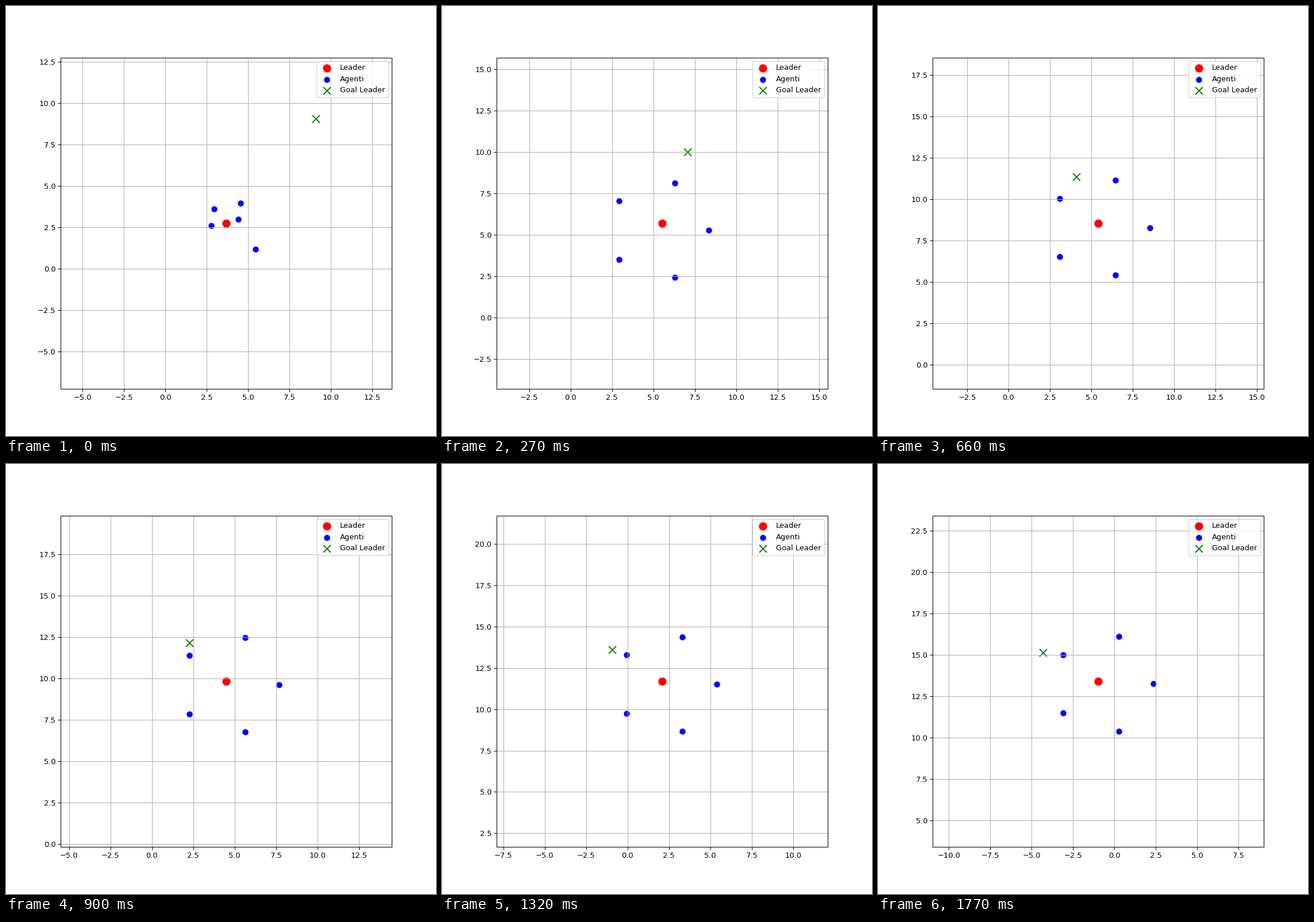
Animation, 748 px wide and 748 px high, one loop 1.8 s. Source, as a matplotlib script:

```python
import numpy as np
import matplotlib.pyplot as plt
from matplotlib.animation import FuncAnimation

FRAMES, INTERVAL = 60, 30
VIEW = 10            # half width of the window that follows the leader
RATE = 0.0634        # leader convergence per frame
TAU = 1.46           # agent time constant in frames

goal_start = np.array([9.09, 9.062])
goal_vel = np.array([-0.2274, 0.1034])
gap_start = np.array([5.405, 6.32])    # goal minus leader
gap_end = np.array([-3.57, 1.63])

angles = 2 * np.pi * np.arange(5) / 5
slots = 3 * np.column_stack([np.cos(angles), np.sin(angles)])
agents_start = np.array([   # relative to the leader
    [0.717, 0.217],
    [0.856, 1.189],
    [-0.741, 0.876],
    [-0.898, -0.165],
    [1.759, -1.572],
])


def goal_at(n):
    return goal_start + goal_vel * n


def leader_at(n):
    gap = gap_end + (gap_start - gap_end) * np.exp(-RATE * n)
    return goal_at(n) - gap


def lag_at(n):
    """Distance by which the formation trails the moving leader."""
    push = RATE * (gap_start - gap_end) * np.exp(-RATE * n)
    return TAU * goal_vel + push / (1 / TAU - RATE)


def agents_at(n):
    offset = agents_start - slots + lag_at(0)
    return leader_at(n) + slots - lag_at(n) + offset * np.exp(-n / TAU)


fig, ax = plt.subplots(figsize=(8, 8), dpi=93.5)
leader = ax.scatter([0], [0], s=100, c="red", label="Leader")
agents = ax.scatter(np.zeros(5), np.zeros(5), s=50, c="blue", label="Agenti")
goal = ax.scatter([0], [0], s=100, c="green", marker="x", label="Goal Leader")
ax.set_aspect("equal")
ax.grid(True)
ax.legend(loc="upper right")


def update(n):
    x, y = leader_at(n)
    leader.set_offsets([[x, y]])
    agents.set_offsets(agents_at(n))
    goal.set_offsets([goal_at(n)])
    ax.set_xlim(x - VIEW, x + VIEW)
    ax.set_ylim(y - VIEW, y + VIEW)
    return leader, agents, goal


anim = FuncAnimation(fig, update, frames=FRAMES, interval=INTERVAL,
                     init_func=lambda: update(0), repeat=True,
                     repeat_delay=0, blit=False)
plt.show()
```
